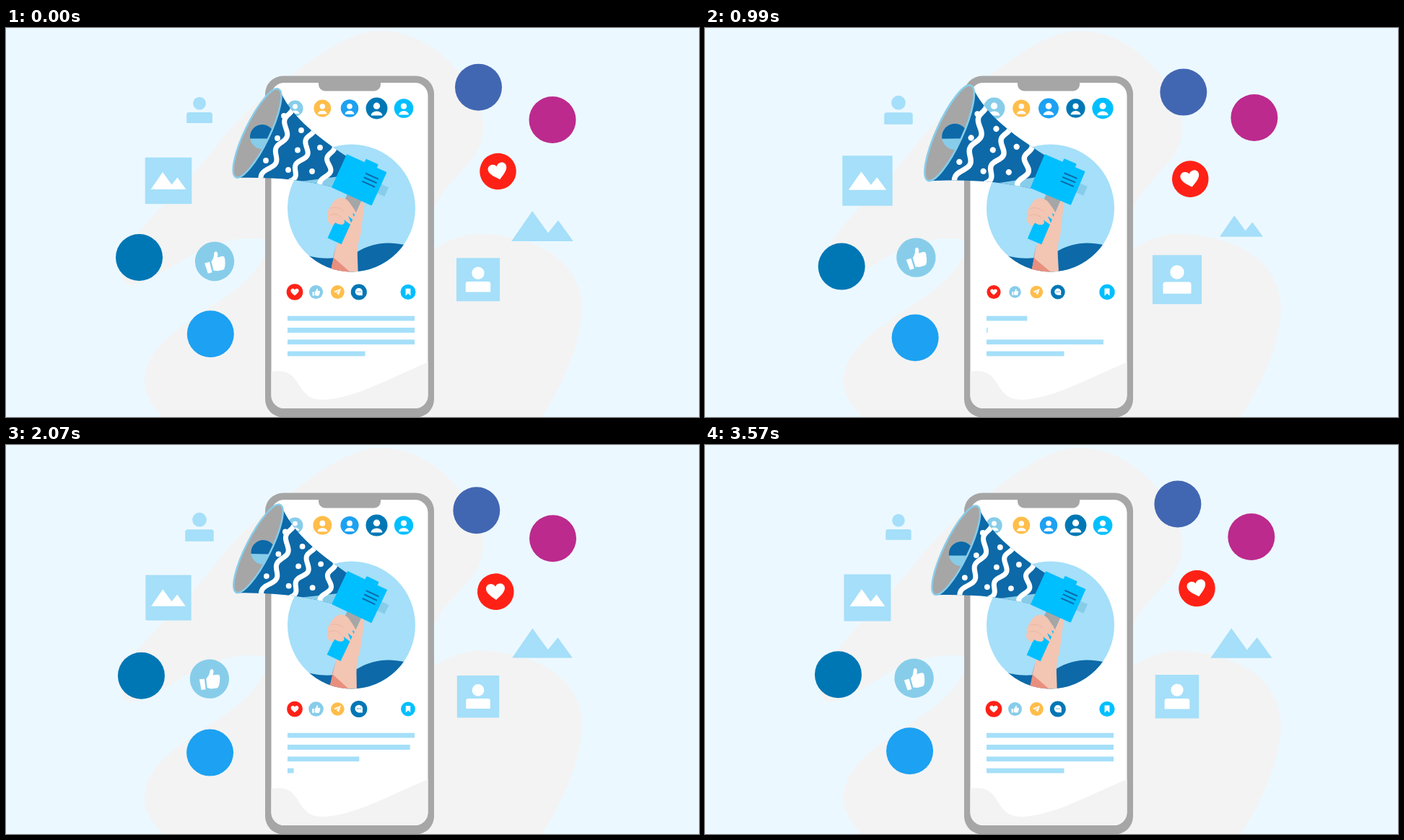
An HTML page with a canvas that plays this animation: 960 px wide and 540 px high, repeating every 3.6 s.

```html
<!DOCTYPE html>
<html>
<head>
<meta charset="utf-8">
<style>
html, body { margin: 0; width: 100%; height: 100%; overflow: hidden; background: #ecf8ff; }
canvas { display: block; }
</style>
</head>
<body>
<canvas id="stage" width="960" height="540"></canvas>
<script>
const c = document.getElementById('stage').getContext('2d');
const LOOP = 3600, CYCLE = 1800, BEAT = 450;
const SKY = '#a5dff9', PALE = '#87cdea', NAVY = '#0d69a8', DEEP = '#0077b5', CYAN = '#00bfff';
const GREY = '#a6a6a6', MIST = '#f3f3f3', AMBER = '#ffbd4a', RED = '#ff2116', AZURE = '#1da1f2';

// --- motion ---
const clamp = x => Math.min(1, Math.max(0, x));
const ease = x => x < .5 ? 2 * x * x : 1 - 2 * (1 - x) ** 2;
const pulse = (t, mean, amp, peak, period = CYCLE) =>
  mean + amp * Math.cos(2 * Math.PI * (t - peak) / period);

// Smooth closed curve that meets one of four values on each beat
function orbit(t, ...v) {
  const beat = Math.floor(t / BEAT), u = t / BEAT - beat;
  const [a, b, d, e] = [3, 4, 5, 6].map(k => v[(beat + k) % 4]);
  return b + u * ((d - a) + u * ((2 * a - 5 * b + 4 * d - e) + u * (3 * (b - d) + e - a))) / 2;
}

// Quick swell followed by a slow release
function shout(t) {
  const p = t % CYCLE;
  return 1 + .128 * ease(clamp((p - 270) / 150)) * clamp((CYCLE - p) / 1380) ** 1.3;
}

// Bars wipe out in one beat, then write themselves in over three
function barFill(t) {
  if (t <= 0 || t >= CYCLE) return 1;
  return t < BEAT ? 1 - ease(t / BEAT) : ease((t - BEAT) / (CYCLE - BEAT));
}

// --- drawing helpers ---
function at(x, y, scale, degrees, draw) {
  c.save();
  c.translate(x, y);
  c.rotate(degrees * Math.PI / 180);
  c.scale(scale, scale);
  draw();
  c.restore();
}
function clipped(path, draw) {
  c.save();
  c.clip(path);
  draw();
  c.restore();
}
function fill(color, build) {
  c.fillStyle = color;
  c.beginPath();
  build();
  c.fill();
}
const disc = (x, y, r, color) => fill(color, () => c.arc(x, y, r, 0, 7));
const rect = (x, y, w, h, color) => fill(color, () => c.rect(x, y, w, h));
const box = (x, y, w, h, r, color) => fill(color, () => c.roundRect(x, y, w, h, r));
const shape = (color, d) => { c.fillStyle = color; c.fill(new Path2D(d)); };

// --- icons, drawn around the origin ---
const peaks = color => shape(color, 'M-43 21L-14-21L8 9.5L22-8L43 21Z');
function person(color) {
  disc(0, -11, 10.5, color);
  box(-21, 3.5, 42, 17.5, [4, 4, 1, 1], color);
}
const heart = () => shape('#fff',
  'M0 11.5C-4 8-13 2-13-4.5C-13-9-9.5-11-6.5-11C-3.5-11-1-9.5 0-7C1-9.5 3.5-11 6.5-11C9.5-11 13-9 13-4.5C13 2 4 8 0 11.5Z');
const thumb = () => shape('#fff',
  `M-14-1H-7V14H-13Z
   M-4.5-1C0-4 1-8 2-11Q3-14 6-12.5Q8-10 5-4.5H12Q15-4 14.5-1Q15 1 14 3Q14 6 13 7Q13 10 11.5 11Q11 14 8 14H1L-4.5 12Z`);
const plane = () => shape('#fff', 'M13-13L-15-2L-7 2L9-9L-4 4L5 12Z');
const bookmark = () => shape('#fff', 'M-8.5-12H8.5V13L0 5L-8.5 13Z');
function chat() {
  disc(0, -1, 12, '#fff');
  shape('#fff', 'M0 11H12L11 0Z');
  for (const x of [-5, 0, 5]) disc(x, -1, 1.6, DEEP);
}
function avatar(x, r, color) {
  const y = 111.5;
  disc(x, y, r, color);
  disc(x, y - r * .22, r * .31, '#fff');
  fill('#fff', () => c.ellipse(x, y + r * .67, r * .53, r * .4, 0, Math.PI, 0));
}
function badge(x, r, color, icon) {
  disc(x, 366.5, r, color);
  at(x, 366.5, r / 26, 0, icon);
}

// --- scene parts ---
function backdrop() {
  rect(0, 0, 960, 540, '#ecf8ff');
  shape(MIST, `M518 4C570 4 610 35 640 78C668 120 667 155 645 183C620 213 597 230 590 262
    V308C615 294 635 284 662 286C710 288 755 304 780 335C804 370 799 400 792 430C782 470 762 510 742 540
    H217C198 520 190 502 192 484C197 440 250 410 290 383C330 357 346 340 360 313V294
    C325 288 298 296 265 311C230 329 195 356 172 357C151 352 162 315 182 286
    C215 245 250 215 285 172C315 132 350 98 395 66C435 36 478 4 518 4Z`);
}

const screen = new Path2D();
screen.roundRect(367.5, 76, 217, 452, 18);

function phone(t) {
  box(359, 66.5, 234, 474, 25, GREY);
  c.fillStyle = '#fff';
  c.fill(screen);
  box(433, 70, 86, 17.5, [0, 0, 9, 9], GREY);
  clipped(screen, () => shape(MIST,
    'M367 477C388 474 396 479 405 494C415 512 425 516 440 516C485 514 535 484 585 464V530H367Z'));

  avatar(400.5, pulse(t, 12.9, 2.1, 1060), PALE);
  avatar(438.3, pulse(t, 12.6, .7, 430, 900), AMBER);
  avatar(476, pulse(t, 13.1, .9, 900), AZURE);
  avatar(513.5, pulse(t, 14.1, 1, 160), DEEP);
  avatar(551, pulse(t, 13.9, .8, 1100), CYAN);

  badge(400, pulse(t, 10.4, .95, 1740), RED, heart);
  badge(429.5, pulse(t, 9.1, 1.25, 330), PALE, thumb);
  badge(459.3, pulse(t, 9.1, .3, 0), AMBER, plane);
  badge(488.8, pulse(t, 10.6, .95, 300), DEEP, chat);
  badge(557, pulse(t, 10.5, .75, 1350), CYAN, bookmark);

  for (let i = 0; i < 4; i++) {
    rect(390, 399.8 + i * 16.3, (i < 3 ? 176 : 107.5) * barFill(t - i * BEAT), 6.8, SKY);
  }
}

const post = new Path2D();
post.arc(478.5, 250, 88.5, 0, 7);

function arm() {
  shape('#f3c5b3', 'M492 241Q498 240 496 250L491 288Q486 300 487 320L488 350H447L459 297L468 288L480 265Z');
  shape('#e98f7e', 'M458 299L453 318L478 340L447 350Z');
}

function fist() {
  shape('#f3c5b3', `M461 236Q470 235 475 241Q482 250 488 262L480 257L485 270L474 261L480 275
    L468 266Q471 271 466 273Q460 273 456 270Q453 277 448 271Q443 266 446 260Q444 254 449 249Q453 239 461 236Z`);
  c.strokeStyle = '#e6ab9a';
  c.lineWidth = .6;
  c.stroke(new Path2D('M450 250Q460 247 468 254M448 260Q457 255 466 264'));
}

function body() {
  at(472, 175, 1, 24.4, () => {
    rect(24, 50, 21, 67, CYAN);
    rect(24, 50, 21, 19, GREY);
    rect(60, 18, 12, 14, PALE);
    box(27, -5, 19, 8, 1.5, CYAN);
    box(0, 0, 61, 51, 1, CYAN);
    for (let i = 0; i < 3; i++) rect(35, 12.5 + i * 6, 19.5, 2, NAVY);
  });
}

// Wave along an axis that bows to the right, like the rim
function wavyBand(x0, y0, x1, y1, waves, bow) {
  const dx = x1 - x0, dy = y1 - y0, len = Math.hypot(dx, dy);
  c.beginPath();
  for (let u = 0; u <= 1; u += .02) {
    const s = 4.5 * Math.sin(u * waves * 2 * Math.PI) + bow * 4 * u * (1 - u);
    c.lineTo(x0 + dx * u + dy / len * s, y0 + dy * u - dx / len * s);
  }
  c.stroke();
}

// Evenly spread dots between the bands
function dotRow(x0, y0, x1, y1, count, bow) {
  for (let i = 0; i < count; i++) {
    const u = i / (count - 1);
    disc(x0 + (x1 - x0) * u + bow * 4 * u * (1 - u), y0 + (y1 - y0) * u, 3.9, '#fff');
  }
}

const cone = new Path2D('M378 84C394 121 424 146 473 179L453 221C408 210 370 207 318 208Z');
const rim = new Path2D();
rim.ellipse(348, 146, 17, 68, .45, 0, 7);

function horn() {
  clipped(cone, () => {
    rect(300, 70, 190, 160, NAVY);
    shape(PALE, 'M408 213L462 206L455 224Z');
    c.strokeStyle = '#fff';
    c.lineWidth = 7;
    c.lineJoin = 'round';
    wavyBand(394, 99, 353, 212, 3, 9);
    wavyBand(424, 130, 390, 214, 2.5, 7);
    wavyBand(451, 156, 436, 222, 2, 4);
  });
  dotRow(385, 122, 360, 184, 3, 3.5);
  dotRow(409, 142, 391, 197, 3, 4);
  dotRow(435, 166, 424, 199, 2, 0);

  c.fillStyle = GREY;
  c.fill(rim);
  clipped(rim, () => {
    disc(355, 151, 17, PALE);
    fill(NAVY, () => c.arc(355, 151, 17, 3, .15));
  });
  c.strokeStyle = PALE;
  c.lineWidth = 2.5;
  c.stroke(rim);
}

function megaphone(t) {
  const swing = orbit(t, 0, 1.2, -1.3, -.4);
  const swung = draw => at(478, 235, 1, swing, () => {
    c.translate(-478, -235);
    draw();
  });
  clipped(post, () => {
    rect(388, 160, 182, 182, SKY);
    shape(NAVY, 'M412 314C430 320 455 324 486 311C508 298 528 296 552 301L580 345H400Z');
    swung(arm);
  });
  swung(() => {
    at(461, 200, shout(t), 0, () => {
      c.translate(-461, -200);
      horn();
    });
    body();
    fist();
  });
}

function floaters(t) {
  disc(orbit(t, 654.5, 652, 662, 662.5), orbit(t, 82.3, 95.5, 90, 86), 32.5, '#4267b2');
  disc(orbit(t, 757, 758, 762, 753.5), orbit(t, 127.5, 130.3, 124.3, 128), 32.5, '#bc2a8d');
  disc(orbit(t, 184.5, 189.5, 189.2, 189), orbit(t, 318.5, 323, 331, 327.5), 32.5, DEEP);
  disc(orbit(t, 283.3, 283.5, 290.5, 291), orbit(t, 424.7, 429, 430, 428.7), 32.5, AZURE);

  at(orbit(t, 681.5, 675.5, 672, 676), orbit(t, 199, 207.3, 209.8, 206.5), 1,
    pulse(t, -7, 7, 420, 900), () => { disc(0, 0, 25.3, RED); heart(); });
  at(orbit(t, 289, 279.5, 290.5, 297.5), orbit(t, 324, 324, 319.3, 317.5), 1,
    pulse(t, -14, 9, 450), () => { disc(0, 0, 27.2, PALE); thumb(); });

  at(268, 114, pulse(t, .91, .1, 630), 0, () => person(SKY));
  at(743, 275, pulse(t, .85, .153, 90), 0, () => peaks(SKY));
  at(225, 212, pulse(t, 1.025, .052, 1170), 0, () => {
    rect(-32.5, -32.5, 65, 65, SKY);
    c.scale(.57, .57);
    peaks('#fff');
  });
  at(654, 349.2, pulse(t, 1.06, .087, 1140), 0, () => {
    rect(-30, -30, 60, 60, SKY);
    c.scale(.82, .82);
    person('#fff');
  });
}

let start;
function frame(now) {
  start ??= now;
  const t = (now - start) % LOOP;
  backdrop();
  phone(t);
  megaphone(t);
  floaters(t);
  requestAnimationFrame(frame);
}
requestAnimationFrame(frame);
</script>
</body>
</html>
```
